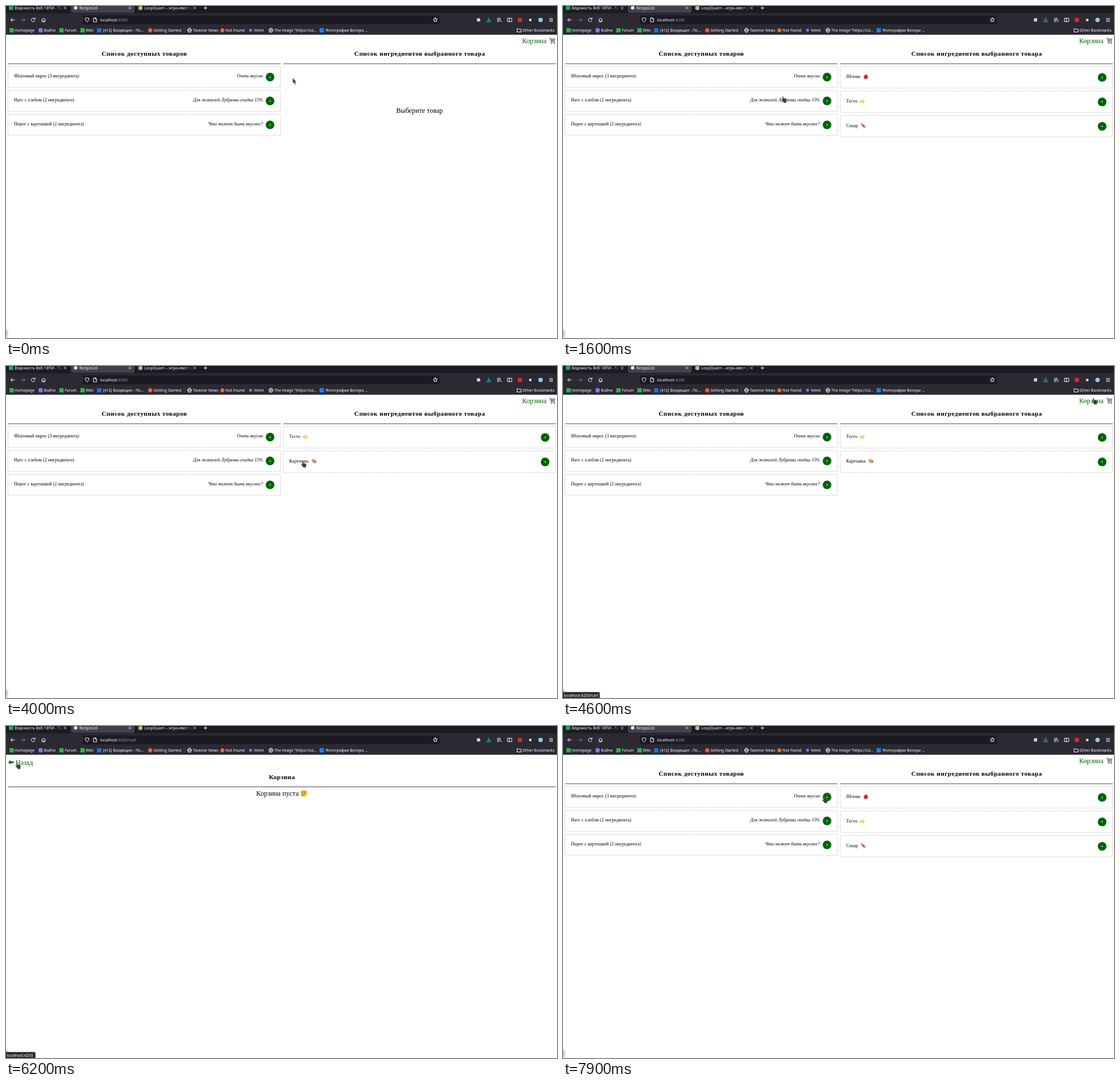
These frames come from a looping animation (965 by 581 pixels, 8000 ms). An HTML page:

```html
<!DOCTYPE html>
<html lang="ru">
<head>
<meta charset="utf-8">
<title>RecipeList</title>
<style>
html, body { margin: 0; width: 100%; height: 100%; overflow: hidden; background: #fff; }
svg { display: block; width: 100vw; height: 100vh; }
.ui { font: 6.75px "Noto Sans", "Open Sans", sans-serif; fill: #fbfbfe; }
.url { font-size: 7.05px; }
.dim { fill: #9a99a3; }
.body { font: 8.1px "Liberation Serif", "Times New Roman", serif; fill: #000; }
.note { font-style: italic; text-anchor: end; }
.big { font-size: 12.06px; }
.link { fill: #006400; }
.head { font-size: 11.3px; font-weight: bold; letter-spacing: .44px; }
.mid { text-anchor: middle; }
.line { fill: none; stroke: #fbfbfe; stroke-width: 1; stroke-linecap: round; stroke-linejoin: round; }
.box { fill: none; stroke: #b8b8b8; stroke-width: .9; stroke-dasharray: 1.6 1.5; }
</style>
</head>
<body>
<svg id="stage" viewBox="0 0 965 581" preserveAspectRatio="none">
  <defs>
    <linearGradient id="fadeA" gradientUnits="userSpaceOnUse" x1="86" x2="100">
      <stop stop-color="#fbfbfe"/><stop offset="1" stop-color="#fbfbfe" stop-opacity="0"/>
    </linearGradient>
    <linearGradient id="fadeB" gradientUnits="userSpaceOnUse" x1="313" x2="327">
      <stop stop-color="#fbfbfe"/><stop offset="1" stop-color="#fbfbfe" stop-opacity="0"/>
    </linearGradient>
    <radialGradient id="shade">
      <stop stop-color="#000" stop-opacity=".38"/><stop offset="1" stop-color="#000" stop-opacity="0"/>
    </radialGradient>
  </defs>
  <rect width="965" height="581" fill="#fff"/>
  <g id="list"></g>
  <g id="cart"></g>
  <g id="chrome"></g>
  <ellipse cx="-1" cy="573" rx="6.5" ry="11" fill="url(#shade)"/>
  <g id="status">
    <path id="bubble" fill="#2b2a33" stroke="#55545c" stroke-width=".5"/>
    <text id="hint" class="ui" x="1.5" y="579"></text>
  </g>
  <g id="pointer">
    <path id="arrow" d="M.3 .2V9.4L2.3 7.6L4 11.3L5.5 10.6L3.9 7.1L6.4 6.9Z" fill="#3d3d3d" stroke="#999" stroke-width=".4"/>
    <path id="hand" d="M2.1 .9Q3 -.3 3.9 .9L4.3 3.6L8.2 4.3Q9.7 4.7 9.6 6.2L9 9V11.2H4V9.8L.6 6.6Q.3 5.3 1.5 5.5L2.9 6.3Z" fill="#3d3d3d" stroke="#999" stroke-width=".4"/>
  </g>
</svg>
<script>
const $ = id => document.getElementById(id);
const text = (x, y, cls, s, extra = "") => `<text x="${x}" y="${y}" class="${cls}" ${extra}>${s}</text>`;
const rect = (x, y, w, h, fill, r = 0) => `<rect x="${x}" y="${y}" width="${w}" height="${h}" rx="${r}" fill="${fill}"/>`;
const disc = (x, y, r, fill) => `<circle cx="${x}" cy="${y}" r="${r}" fill="${fill}"/>`;
const oval = (x, y, rx, ry, fill, turn = 0) =>
  `<ellipse cx="${x}" cy="${y}" rx="${rx}" ry="${ry}" fill="${fill}" transform="rotate(${turn} ${x} ${y})"/>`;
const line = (d, extra = "") => `<path class="line" d="${d}" ${extra}/>`;
const at = (x, y, s) => `<g transform="translate(${x} ${y})">${s}</g>`;
const cross = x => line(`M${x - 2} 1.5l4 4m0 -4l-4 4`, 'style="stroke-width:.8"');
const plus = (x, y) => disc(x, y, 7.6, "#006400") +
  `<path d="M${x - 1.6} ${y}h3.2M${x} ${y - 1.6}v3.2" stroke="#dfeadf" stroke-width=".7"/>`;
const globe = x => line(`M${x - 3.6} 42.5a3.6 3.6 0 1 0 7.2 0a3.6 3.6 0 1 0 -7.2 0h7.2M${x} 38.9q-3.4 3.6 0 7.2q3.4 -3.6 0 -7.2`, 'style="stroke-width:.8"');

// Food icons, drawn around their own centre
const icons = {
  apple: oval(0, .4, 3.7, 3.6, "#d3202c") + oval(-1.4, -.5, 1, 1.3, "#ef5350") +
    '<path d="M0 -2.6Q.2 -4 1 -4.4" stroke="#6d4c41" stroke-width=".8" fill="none"/>' + oval(1.9, -3.2, 1.3, .6, "#689f38", -20),
  dough: oval(0, .2, 4.2, 2.9, "#fbc956") + oval(-.2, -.4, 2.9, 1.6, "#ffe29a") +
    '<path d="M-3.6 .9Q0 3.2 3.6 .9" stroke="#e9a93a" stroke-width=".7" fill="none"/>',
  sugar: '<g transform="rotate(42)"><path d="M-5 -1.8L-1.8 0L-5 1.8ZM5 -1.8L1.8 0L5 1.8Z" fill="#e57386"/>' +
    rect(-2.7, -2, 5.4, 4, "#d32f45", 1.4) + rect(-.7, -2, 1.1, 4, "#f7b5c0") + "</g>",
  bacon: '<g transform="rotate(-40)">' + rect(-4.9, -2, 9.8, 4, "#b5573f", 1.6) +
    '<path d="M-4.4 -.6Q-2 -1.6 0 -.4T4.4 -.5M-4 1Q-2 .2 0 1T4 .9" stroke="#efb592" stroke-width=".8" fill="none"/></g>',
  bread: rect(-3.8, -3.5, 7.6, 7.1, "#c9823f", 1.3) + rect(-2.4, -2.7, 5.5, 5.6, "#f6d9a6", 1),
  potato: oval(0, 0, 4.5, 2.9, "#c08a70", 25) + oval(-.6, -.7, 2.9, 1.5, "#d9a98f", 25) +
    disc(1.8, .6, .35, "#8d5a46") + disc(-1.5, .5, .35, "#8d5a46"),
};

const tray = '<path d="M.6 1.2H2.6L4 8.3H10.4" fill="none" stroke="#566068" stroke-width="1"/>' +
  '<path d="M2.9 2.6H10.8L9.8 6.9H3.8Z" fill="#a9b4bb" stroke="#66727a" stroke-width=".7"/>' +
  '<path d="M5 2.8L5.5 6.8M7 2.8V6.8M9 2.8L8.5 6.8M3.4 4.7H10" stroke="#66727a" stroke-width=".5"/>' +
  disc(4.7, 10.3, 1.1, "#444c52") + disc(9.3, 10.3, 1.1, "#444c52");

const sadFace = disc(0, 0, 6.1, "#fcc934") + oval(-2, -.6, .8, 1.1, "#493628") + oval(2, -.6, .8, 1.1, "#493628") +
  '<path d="M-2 3.6Q0 1.5 2 3.6M-4 -2.5L-1.6 -3.5M4 -2.5L1.6 -3.5" fill="none" stroke="#493628" stroke-width=".8"/>' +
  '<path d="M-2.8 .9Q-5.2 4.3 -2.9 5Q-.6 4.6 -2.8 .9Z" fill="#42a5f5"/>';

const goods = [
  ["Яблочный пирог (3 ингредиента)", "Очень вкусно"],
  ["Натс с хлебом (2 ингредиента)", "Для жителей Лубремы скидка 15%"],
  ["Пирог с картошкой (2 ингредиента)", "Что может быть вкуснее?"],
];
const panels = [
  [],
  [["Яблоко", "apple", 530.3], ["Тесто", "dough", 524], ["Сахар", "sugar", 525.8]],
  [["Натс", "bacon", 521.4], ["Хлеб", "bread", 522.5]],
  [["Тесто", "dough", 524], ["Картошка", "potato", 539.5]],
];

function buildList() {
  let s = text(904, 65, "body big link", "Корзина") + at(950.8, 54.8, tray) +
    text(242.3, 87.2, "body head mid", "Список доступных товаров") +
    text(724.6, 87.2, "body head mid", "Список ингредиентов выбранного товара") +
    rect(3.5, 100.6, 477.3, .9, "#333") + rect(485.5, 100.6, 477.3, .9, "#333");
  goods.forEach(([name, note], i) => {
    const y = 41.8 * i;
    s += `<rect class="box" x="3.5" y="${106 + y}" width="477" height="36.6"/>` +
      text(14, 125.4 + y, "body", name) + text(450, 125.4 + y, "body note", note) + plus(462.4, 124.4 + y);
  });
  panels.forEach((rows, n) => {
    s += `<g id="panel${n}">` + (n ? "" : text(724.3, 186.6, "body big mid", "Выберите товар"));
    rows.forEach(([name, icon, x], i) => {
      const y = 42.8 * i;
      s += `<rect class="box" x="485.7" y="${106 + y}" width="477" height="37.5"/>` +
        text(496, 126 + y, "body", name) + at(x, 123.7 + y, icons[icon]) + plus(944.2, 125 + y);
    });
    s += "</g>";
  });
  return s;
}

function buildCart() {
  return '<path d="M4 63.5L8 59.8V62H13.3V65H8V67.2Z" fill="#006400"/>' +
    text(16.8, 67.8, "body big link", "Назад") +
    text(483.4, 93, "body head mid", "Корзина") + rect(3.5, 106.1, 959, .9, "#333") +
    text(438.3, 122, "body big", "Корзина пуста") + at(521.5, 117.8, sadFace);
}

function buildChrome() {
  let s = rect(0, 0, 965, 50.3, "#2b2a33") + rect(0, 0, 965, 12.5, "#1c1b22") +
    rect(114, -5, 111, 16.8, "#42414d", 2) +
    rect(134.5, 16.5, 625, 15.6, "#1c1b22", 2);
  // Tabs
  s += rect(5, 0, 7.5, 7, "#16a765") + text(15, 6, "ui", "Ведомость Веб 18ПИ - Tu", 'style="fill:url(#fadeA)"') +
    disc(122, 3.3, 3, "#f1f1f4") + text(128.5, 6, "ui", "RecipeList") +
    disc(235.3, 3.5, 3.8, "#a9b88c") + text(242, 6, "ui", "LoopQuarn – игра-квест дл", 'style="fill:url(#fadeB)"') +
    cross(103.5) + cross(217) + cross(330.3) + line("M346.4 3.5h5.6M349.2 .7v5.6");
  // Navigation
  s += line("M15 24.3H8.3M11.2 21.3L8.2 24.3L11.2 27.3") +
    line("M26.3 24.3H33M30.1 21.3L33.1 24.3L30.1 27.3", 'opacity=".38"') +
    line("M50.4 22.6A3.2 3.2 0 1 0 50.6 25.4M50.9 20.7V23H48.5") +
    line("M62.3 24.3L65.7 21L69.1 24.3M63.3 23.7V27.7H68.1V23.7M65.7 27.5V25.3") +
    line("M142 20.6L145.3 21.8Q145.6 26 142 28Q138.4 26 138.7 21.8Z") +
    line("M153.6 20.8H156.8L158.7 22.8V27.8H153.6ZM156.6 21V23H158.5") +
    line("M752 20.5L753.1 22.9L755.6 23.1L753.7 24.9L754.3 27.5L752 26.2L749.7 27.5L750.3 24.9L748.4 23.1L750.9 22.9Z") +
    rect(824.8, 21.5, 5.6, 5.6, "#d4d4da") +
    line("M845.4 20.6V25.4M843.2 23.5L845.4 25.6L847.6 23.5M842.2 26V27.7H848.7V26", 'style="stroke:#00c8ea"') +
    line("M861 21V27.7M863.3 21V27.7M865 21.2L867.2 27.6") +
    line("M878.6 21.3H885.8V27.4H878.6ZM881.6 21.3V27.4") +
    disc(900, 24.3, 4, "#e0262f") + rect(916.2, 22.4, 4, 4, "#e6e6ea") + disc(936.2, 24.3, 3.9, "#8fcbe8") +
    line("M951.7 21.8h5.8m0 2.5h-5.8m0 2.5h5.8");
  s += text(165, 26.7, "ui url", 'localhost<tspan class="dim">:4200</tspan><tspan id="path" class="dim">/cart</tspan>');
  // Bookmarks
  const green = "#2fb34c";
  const marks = [
    [15, "Homepage"], [66.5, "Войти"], [103, "Forum"], [139.8, "Wiki"], [170, "(412) Входящие - По..."],
    [258.3, "Getting Started"], [327.3, "Tavenor News"], [384.5, "Not Found"], [434, "Velmi"],
    [470, "The image “https://cd..."], [559.5, "Фотографии Велора ..."], [904.6, "Other Bookmarks"],
  ];
  for (const [x, label] of marks) s += text(x, 45, "ui", label);
  s += [6, 93.3, 130.3].map(x => rect(x, 38.8, 7.6, 7.4, green)).join("") +
    disc(60.6, 42.5, 3.9, "#7c7cf0") + rect(159.6, 39, 7.2, 7.2, "#1976e8") + disc(252.6, 42.5, 3.8, "#f0554a") +
    globe(321.4) + disc(379, 42.5, 3.6, "#f0652c") + disc(428.3, 42.3, 2.6, "#8178e6") + globe(464) +
    rect(549.3, 38.8, 7.4, 7.4, "#1684f5") + rect(311.7, 38, .7, 9, "#5b5a66") +
    line("M895.5 39.7H898L899 40.8H902.2V45.5H895.5Z");
  return s;
}

$("list").innerHTML = buildList();
$("cart").innerHTML = buildCart();
$("chrome").innerHTML = buildChrome();

const LOOP = 8000, STEP = 100;
// Pointer stops: time, x, y
const stops = [
  [0, 502, 126], [100, 502, 126], [400, 461, 125], [700, 461, 125], [900, 370, 126], [1300, 370, 126],
  [1600, 382, 158], [2300, 382, 158], [2500, 378, 161], [2800, 378, 161], [2900, 374, 204], [3000, 373, 205],
  [3700, 373, 205], [4600, 926, 56], [4700, 924, 57], [5300, 414, 66], [5500, 494, 119], [6000, 15, 64],
  [6200, 16, 64], [6500, 487, 124.5], [6800, 463, 127], [7000, 463, 127], [7200, 387, 124], [7500, 387, 124],
  [7900, 453.5, 123.5], [LOOP, 453.5, 123.5],
];
const choices = [[0, 0], [1100, 1], [2100, 2], [3300, 3], [7500, 1]];
const ease = u => u * u * (3 - 2 * u);

function pointerAt(t) {
  const i = stops.findIndex(s => s[0] > t);
  const [t0, x0, y0] = stops[i - 1], [t1, x1, y1] = stops[i];
  const u = ease((t - t0) / (t1 - t0));
  return [x0 + (x1 - x0) * u, y0 + (y1 - y0) * u];
}

function clickable(x, y, inCart, rows) {
  if (inCart) return x < 47 && y > 57 && y < 71;
  if (y < 70) return x > 900 && y > 54;
  if (x < 481) return y > 106 && y < 226;
  return x > 485 && y > 106 && y < 106 + 42.8 * rows;
}

const show = (id, on) => $(id).setAttribute("display", on ? "inline" : "none");

function draw(now) {
  const t = Math.floor((now % LOOP) / STEP) * STEP;
  const inCart = t >= 4700 && t < 6300;
  const chosen = choices.filter(c => c[0] <= t).pop()[1];
  const [x, y] = pointerAt(t);
  const over = clickable(x + 2, y, inCart, panels[chosen].length);

  show("list", !inCart);
  show("cart", inCart);
  show("path", inCart);
  panels.forEach((_, n) => show("panel" + n, n === chosen));

  show("status", t === 4600 || t === 6200);
  const wide = inCart ? 49.5 : 62.3;
  $("bubble").setAttribute("d", `M-1 570.7H${wide}q2 0 2 2V582H-1Z`);
  $("hint").textContent = inCart ? "localhost:4200" : "localhost:4200/cart";

  show("hand", over);
  show("arrow", !over);
  $("pointer").setAttribute("transform", `translate(${x.toFixed(2)} ${y.toFixed(2)})`);
}

function tick() {
  draw(performance.now());
  requestAnimationFrame(tick);
}
tick();
</script>
</body>
</html>
```
